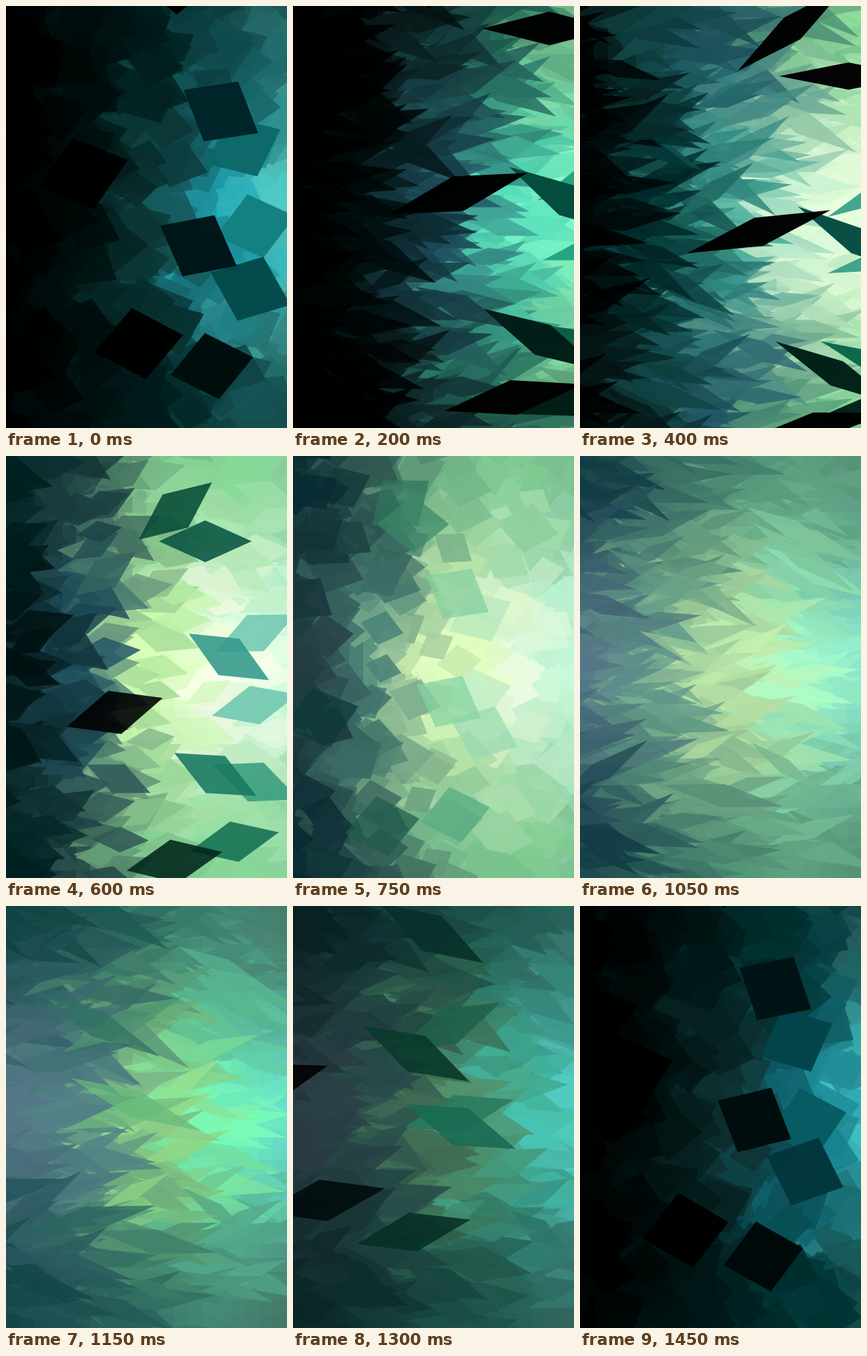
These frames come from a looping animation (400x600 px, 1.5 s). An HTML page with a canvas:

```html
<!DOCTYPE html>
<html lang="en">
<head>
<meta charset="utf-8">
<title>Drifting shards</title>
<style>
  html, body { margin: 0; width: 100%; height: 100%; overflow: hidden; background: #000; }
  canvas { display: block; }
</style>
</head>
<body>
<canvas id="stage" width="400" height="600"></canvas>
<script>
const ctx = document.getElementById('stage').getContext('2d');
const LOOP = 1500, STEP = 50, TAU = Math.PI * 2;

// Light over time: colours at x = 0..400 for the middle row, then for the top and bottom rows.
const hex = s => [...s].map(c => parseInt(c, 16) * 17);
const light = [
  [0,    '000 011 144 2ab 6dc', '000 011 022 144 266'],
  [200,  '000 011 256 5db 8fc', '000 000 133 265 7b8'],
  [400,  '000 033 4a9 dfd efd', '000 144 256 597 8d9'],
  [600,  '011 256 cfa ffe cfd', '022 244 7b8 8d9 8c9'],
  [950,  '578 8c9 ffc dfd aec', '134 476 6a8 7b8 6a8'],
  [1150, '578 588 9d8 7fb 6dc', '144 255 376 487 476'],
  [1450, '000 011 133 178 4cc', '000 011 022 033 255'],
].map(([time, mid, edge]) => ({ time, rows: [mid, edge].map(r => r.split(' ').map(hex)) }));
light.push({ time: LOOP, rows: light[0].rows });

const clamp = (v, lo = 0, hi = 1) => Math.min(hi, Math.max(lo, v));
const mix = (a, b, k) => a.map((v, i) => v + (b[i] - v) * k);

function lightAt(t) {
  const i = light.findIndex(key => key.time > t);
  const a = light[i - 1], b = light[i];
  const k = (t - a.time) / (b.time - a.time);
  return a.rows.map((row, r) => row.map((c, j) => mix(c, b.rows[r][j], k)));
}

function sample(rows, x, y) {
  const gx = clamp(x / 100, 0, 3.999), i = Math.floor(gx);
  const u = clamp(Math.abs(y - 300) / 300);
  const [mid, edge] = rows.map(row => mix(row[i], row[i + 1], gx - i));
  return mix(mid, edge, u * u * (3 - 2 * u));
}

let seed = 7;
const random = () => {
  seed = (seed * 16807) % 2147483647;
  return seed / 2147483647;
};
const spread = n => (random() * 2 - 1) * n;

// Each shard rides an ellipse: centre + cosine and sine parts per axis.
const shards = Array.from({ length: 950 }, () => ({
  x: [-220 + random() * 760, 35, 120 + random() * 65],
  y: [-180 + random() * 840, -70 * random(), 170 * random()],
  turn: spread(36), size: 0.5 + random() * 0.4, dark: 0,
  dx: spread(50), dy: spread(40),
}));
const order = s => s.x[0] + s.dx * 1.5 - Math.abs(s.y[0] - 260) * 0.4;
shards.sort((a, b) => order(b) - order(a));

const front = [
  [302, 36, 140, 214, -14, 45, -25, 0.95, 0.35],
  [309, 46, 140, 326, -13, 30, -14, 0.95, 0.35],
  [310, 38, 130, 398, 4, 117, 22, 1, 0.55],
  [262, 31, 150, 511, 1, 65, -12, 0.98, 0.85],
  [270, 36, 130, 173, -23, 160, 30, 1, 0.7],
  [248, 26, 121, 345, -4, 178, 27.6, 1, 0.85],
  [153, 0, 150, -28, -95, 50, -38, 1, 1.1],
  [207, 36, 180, 30, -67, 63, 0, 1, 1.1],
  [158, 31, 182, 503, -23, 93, -11, 1.05, 1.4],
  [75, 35, 184, 305, -67, 9, -16.7, 1.08, 2],
].map(([x, xc, xs, y, yc, ys, turn, size, dark]) =>
  ({ x: [x, xc, xs], y: [y, yc, ys], turn, size, dark, dx: 0, dy: 0 }));

function draw(t) {
  const rows = lightAt(t), angle = TAU * t / LOOP;
  const cos = Math.cos(angle), sin = Math.sin(angle);
  const stretch = Math.abs(Math.sin(angle + 0.134));
  const shadow = clamp(0.65 + 0.7 * Math.cos(angle - 0.84));
  const along = 56 * Math.exp(0.68 * stretch), across = 56 * Math.exp(-stretch);
  const scale = 0.92 + 0.08 * cos;

  ctx.globalAlpha = 1;
  for (let y = 0; y < 600; y += 20) {
    for (let x = 0; x < 400; x += 20) {
      ctx.fillStyle = `rgb(${sample(rows, x + 10, y + 10).map(Math.round)})`;
      ctx.fillRect(x, y, 20, 20);
    }
  }

  const place = ([c, a, b]) => c + a * cos + b * sin;
  const paint = s => {
    const x = place(s.x), y = place(s.y);
    if (x < -130 || x > 530 || y < -130 || y > 730) return;
    const k = clamp(1 - s.dark * shadow);
    const [r, g, b] = sample(rows, x + s.dx, y + s.dy);
    ctx.fillStyle = `rgb(${[r * k ** 3, g * k, b * k].map(Math.round)})`;
    const turn = s.turn * Math.PI / 180, size = s.size * scale;
    const ax = Math.cos(turn) * along * size, ay = Math.sin(turn) * along * size;
    const bx = -Math.sin(turn) * across * size, by = Math.cos(turn) * across * size;
    ctx.beginPath();
    ctx.moveTo(x + ax, y + ay);
    ctx.lineTo(x + bx, y + by);
    ctx.lineTo(x - ax, y - ay);
    ctx.lineTo(x - bx, y - by);
    ctx.fill();
  };
  ctx.globalAlpha = 0.85;
  shards.forEach(paint);
  for (const s of front) {
    ctx.globalAlpha = 0.3 + 0.68 * shadow ** 0.3;
    paint(s);
  }
}

let shown = -1;
function frame() {
  const t = Math.floor(performance.now() % LOOP / STEP) * STEP;
  if (t !== shown) draw(shown = t);
  requestAnimationFrame(frame);
}
frame();
</script>
</body>
</html>
```
